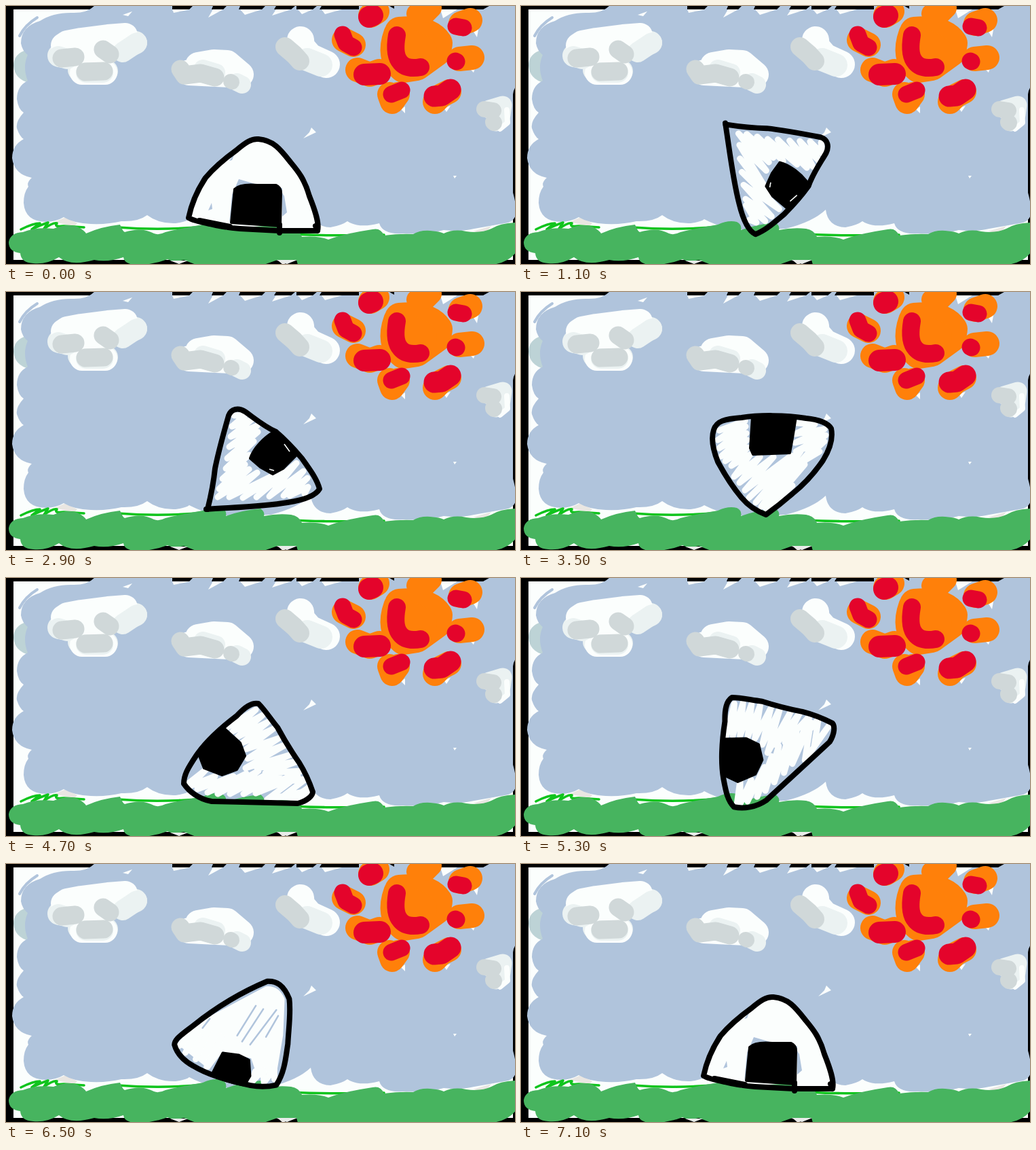
An HTML page that plays this animation: 750x380 px, repeating every 7130 ms.

```html
<!DOCTYPE html>
<html lang="en">
<head>
<meta charset="utf-8">
<title>Rolling rice ball</title>
<style>
  html, body { margin: 0; width: 750px; height: 380px; overflow: hidden; background: #000; }
  svg { display: block; }
  .brush path, .rim, .rice, .nori { stroke-linecap: round; stroke-linejoin: round; }
  .brush path { fill: none; }
  .white { stroke: #fbfefd; }
  .pale { stroke: #ebf2f2; }
  .gray { stroke: #d0d8d9; }
  .orange { stroke: #ff800a; }
  .red { stroke: #e4042b; }
  .grass { stroke: #10c41d; stroke-width: 3.6; }
  .rice { fill: none; stroke: #fbfefd; stroke-width: 9; }
  .rim { fill: none; stroke: #000; stroke-width: 8; }
  .nori { fill: #000; stroke: #000; stroke-width: 4; }
  .pose {
    visibility: hidden;
    animation: show 7130ms step-end calc((var(--k) - 1) * 600ms - 6630ms) infinite;
  }
  .rest { animation: rest 7130ms step-end -30ms infinite; }
  @keyframes show { 0% { visibility: visible; } 8.4151%, 100% { visibility: hidden; } }
  @keyframes rest { 0% { visibility: visible; } 7.4334%, 100% { visibility: hidden; } }
</style>
</head>
<body>
<svg width="750" height="380" viewBox="0 0 750 380">
  <defs>
    <g id="upright">
      <path fill="#fbfefd" d="M372 196C362 195 353 201 340 212C322 225 305 240 294 253C284 268 274 288 269 312L300 321L345 328L402 331L459 331C462 320 455 300 447 280C440 255 430 243 420 231C405 212 395 198 372 196Z"/>
      <path fill="#b0c4dc" d="M333 278L343 255L367 262L400 264L410 280L414 304L407 310V268H340L329 320ZM303 290L304 299L298 301ZM329 228L337 217L333 227Z"/>
      <path fill="#47b45f" d="M365 325L403 323V330Z"/>
      <path class="nori" d="M337 270Q345 262 370 264L398 264Q405 267 405 275L404 324L332 319Z"/>
      <path class="rim" d="M372 196C362 195 353 201 340 212C322 225 305 240 294 253C284 268 274 288 269 312C275 316 290 319 300 321C315 325 330 327 345 328L402 331L459 331C462 320 455 300 447 280C440 255 430 243 420 231C405 212 395 198 372 196ZM285 316L330 325M403 322V334M456 324L459 331"/>
    </g>

    <g id="right">
      <path class="rice" d="M288 247L325 232L289 257L332 236L296 270L322 260L301 284L337 260L305 292L348 253L312 300L362 236L318 310L380 225L330 284L400 216L352 252L418 210L375 235L422 215L398 243L421 226L402 251L418 250M318 310L350 288L332 318L358 296L348 321L366 303L358 323L380 309L372 322L387 320"/>
      <path class="nori" d="M376 248L392 249L403 254L410 268L405 292L396 298L384 297L362 286L364 265ZM370 290L402 306"/>
      <path class="rim" d="M350 331C335 322 320 312 310 304C298 292 292 282 291 270C284 260 277 253 278 243C280 236 290 234 305 230L355 215C375 207 395 200 420 196L428 195C432 202 432 215 430 225C425 245 420 262 412 280C408 295 402 312 393 325C380 330 365 331 350 332Z"/>
    </g>

    <g id="upperRight">
      <path class="rice" d="M336 182L353 181L333 198L362 188L331 213L370 197L329 228L371 206L326 245L365 220L324 260L358 240L319 275L352 254L314 290L358 261L312 302L370 266L329 302L390 272L349 303L408 266L369 302L428 252L388 301L438 264L409 300L444 274L418 300L445 287L440 297"/>
      <path class="nori" d="M393 207C405 215 420 228 428 240L408 260L393 268L375 258L360 245C365 230 380 215 393 207Z"/>
      <path fill="none" stroke="#fbfefd" stroke-width="1.6" d="M410 224L418 235M388 261L395 263"/>
      <path class="rim" d="M297 320C302 300 306 280 308 260C313 235 320 210 328 182C332 172 342 170 352 176C365 185 380 198 398 206C412 218 425 232 436 245C448 262 458 275 462 290C455 302 435 307 415 310C380 316 340 317 295 320"/>
    </g>

    <g id="flipped">
      <path class="rice" d="M292 204L330 190L290 218L331 198L292 230L332 208L295 242L333 218L301 249L334 229L310 256L338 239L314 272L352 243L322 281L372 243L330 292L398 241L336 303L406 238L346 310L412 235L354 316L425 235L361 319L418 254L362 320L400 285M407 193L433 195L404 209L447 202L404 222L449 211L405 235L447 220L415 250L440 235"/>
      <path class="nori" d="M341 184L405 184L400 215L396 237L342 239L338 230Z"/>
      <path class="rim" d="M361 328C345 322 335 315 325 303C310 285 298 265 290 250C282 230 280 215 284 203C288 190 300 187 325 185C350 181 390 181 420 186C440 188 452 193 457 201C460 215 455 232 445 248C430 270 415 285 400 297C385 310 372 320 361 328Z"/>
    </g>

    <g id="left">
      <path class="rice" d="M326 220L368 194L334 226L378 202L341 234L386 212L348 243L394 222L354 252L402 236L356 266L413 245L353 280L420 260L370 280L430 270L382 287L436 284L395 302L442 296L410 320L446 314L385 326L430 292L368 317L408 285L350 318L390 286L330 318L372 284L312 318L354 288L297 316L335 292L282 311L308 292L272 306L296 281L268 303"/>
      <path class="nori" d="M322 222L345 243L352 262L340 282L318 290L292 280L285 262C295 245 308 232 322 222Z"/>
      <path class="rim" d="M372 185C362 183 352 190 340 203C315 222 295 240 280 262C268 280 262 290 262 303C270 315 285 326 303 329C345 330 385 331 430 332C445 328 452 320 452 315C447 300 440 285 432 272C418 252 408 235 400 220C390 208 382 195 372 185Z"/>
    </g>

    <g id="lowerLeft">
      <path fill="#fbfefd" d="M258 222L297 202L410 194Q428 200 428 222L404 270L372 318L345 306L347 282L313 256L284 272Z"/>
      <path class="rice" d="M258 222L290 208M262 235L300 208M272 250L310 215M282 267L320 235M345 302L332 315L356 305L350 322L372 310L366 324"/>
      <path fill="none" stroke="#b0c4dc" stroke-width="2.5" stroke-linecap="round" d="M300 212L315 204M342 243L385 214M345 254L393 223M354 263L410 232M380 262L409 241"/>
      <path class="nori" d="M312 258L332 270L343 283L335 305L322 314C305 303 293 292 285 280Z"/>
      <path class="rim" d="M365 333C350 330 340 325 330 318C305 300 280 280 265 258C255 245 250 232 252 218C255 210 270 208 290 203C325 194 370 187 415 188C428 193 435 203 434 225C428 245 415 265 405 285C395 300 385 320 365 333Z"/>
    </g>
  </defs>

  <!-- paper and sky -->
  <path fill="#fbfefd" d="M11 5H747V374H11Z"/>
  <path fill="#bdd3d6" d="M32 64Q11 70 11 88Q13 108 34 113Z"/>
  <path fill="#e9e6e2" d="M72 318L88 311L105 320L100 325ZM688 332L715 324L706 335ZM395 370H432L408 381Z"/>
  <path fill="#b0c4dc" d="M130 0Q120 10 100 10Q70 9 50 22Q22 30 22 55Q24 66 32 72Q24 90 32 110Q16 118 16 137Q18 152 26 157Q14 170 16 180Q20 192 26 196Q9 205 9 224Q12 248 38 253Q30 260 33 266Q26 275 26 290Q28 318 60 318Q75 317 85 311Q100 320 125 321Q150 322 170 317Q195 318 208 308Q225 321 250 320Q265 318 270 314Q300 330 340 330L390 328Q430 318 449 300Q452 325 478 326Q495 323 503 317Q520 328 550 320Q555 337 585 335Q620 337 645 330Q670 333 690 328L735 320Q752 318 752 300Q750 285 747 275V130Q748 122 752 118V0Z"/>
  <path fill="none" stroke="#b0c4dc" stroke-width="4" stroke-linecap="round" d="M20 44Q28 28 46 17"/>
  <path fill="#fbfefd" d="M172 13L186 8L180 15ZM245 5H272L247 10ZM305 5H320L298 17ZM345 5H377L352 13ZM398 5H420L392 14ZM430 5H452L436 12ZM465 5H495L470 12ZM640 5H665L644 18ZM684 30L698 24L694 46ZM438 195L447 186L450 179L457 186ZM659 250H664L661 254ZM582 152L588 148V158ZM683 92L691 92L689 98ZM645 150L655 147L649 156Z"/>
  <path d="M245 0H275L270 5H245ZM305 0H325L320 5H303ZM345 0H382L377 5H343ZM398 0H426L420 5H395ZM428 0H458L452 5H428ZM465 0H520V5H462ZM565 0H572V4ZM640 0H712L703 5H640Z"/>

  <g class="brush">
    <!-- clouds -->
    <path class="pale" stroke-width="34" d="M78 73L95 75M172 62L191 54M108 94L148 96"/>
    <path class="white" stroke-width="36" d="M84 58L90 54L111 50L150 45L176 43M115 72L146 70M112 98L146 98"/>
    <path class="pale" stroke-width="30" d="M172 68L193 54M77 74L90 78M118 98L143 98"/>
    <path class="gray" stroke-width="27" d="M82 77L102 75M143 64L153 71M117 97L144 96"/>
    <path fill="#b0c4dc" d="M131 77L137 75L134 81Z"/>
    <path class="white" stroke-width="38" d="M283 87L306 83L326 84L346 101M270 98L330 101"/>
    <path class="pale" stroke-width="26" d="M340 112L348 116M290 92L310 98"/>
    <path class="gray" stroke-width="27" d="M257 93L263 102L287 99L308 105"/>
    <path class="gray" stroke-width="22" d="M331 111L333 112"/>
    <path class="white" stroke-width="40" d="M434 50L435 60L448 75L472 86"/>
    <path class="pale" stroke-width="34" d="M444 79L464 87"/>
    <path class="gray" stroke-width="28" d="M411 60L425 72L433 81"/>
    <path class="pale" stroke-width="27" d="M712 152L732 146L730 160L722 171"/>
    <path class="white" stroke-width="8" d="M738 153L739 172L728 181"/>
    <path class="gray" stroke-width="24" d="M705 152L718 154M718 171L719 172"/>

    <!-- sun -->
    <path class="orange" stroke-width="44" d="M578 42Q566 75 586 91L605 88L634 67L636 55Q622 34 580 38"/>
    <path class="orange" stroke-width="46" d="M590 55L612 66"/>
    <path class="orange" stroke-width="36" d="M537 14L547 8M498 50L512 57M518 94L536 101L550 96M565 130L569 141L577 130M632 141L641 132L653 126M668 78L687 76M670 26L684 21"/>
    <path class="orange" stroke-width="28" d="M620 11L628 3M604 11L615 8"/>
    <path fill="#b0c4dc" d="M603 46L608 45L607 49ZM611 55L615 57L612 59ZM598 10L604 13L599 15Z"/>
    <path class="red" stroke-width="26" d="M576 43Q571 72 581 83Q590 94 611 90"/>
    <path class="red" stroke-width="32" d="M535 16L540 14M528 101L551 100"/>
    <path class="red" stroke-width="25" d="M496 42L501 55L512 61M568 130L583 124M663 30L674 32M662 81L664 82"/>
    <path class="red" stroke-width="31" d="M631 133L642 132L655 123"/>

    <!-- grass -->
    <path class="grass" d="M22 329Q40 320 50 320L38 329Q52 322 62 319L56 328Q70 318 75 320Q70 326 85 324L115 326M165 326Q230 331 290 325M420 336Q470 339 557 337"/>
  </g>
  <path fill="#47b45f" d="M4 348Q6 334 25 333Q45 325 70 328Q90 320 105 325Q115 330 118 335Q140 325 168 322Q172 332 175 333Q200 325 218 335Q225 338 235 333Q260 327 290 322Q305 315 318 318Q326 322 324 330Q345 322 375 319Q382 324 380 330Q400 326 420 328Q432 330 436 340Q460 338 475 344Q500 335 540 329Q552 326 557 338Q580 335 600 336Q610 330 625 331Q640 332 645 335Q660 328 678 332Q700 335 715 328Q728 320 752 319V362Q740 379 715 381H430L428 374Q415 381 400 374L380 381H280L262 374L248 377L238 373Q215 382 190 381Q174 380 173 370Q150 378 130 374Q95 384 78 370Q60 381 40 379Q22 378 21 364Q4 362 4 348Z"/>
  <path fill="#e9ecea" d="M242 375H268L255 380ZM398 374H429L414 380Z"/>

  <!-- the roll, one turn -->
  <use class="pose rest" href="#upright"/>
  <use class="pose" style="--k:1" href="#right" transform="translate(0 3) rotate(45 362 258)"/>
  <use class="pose" style="--k:2" href="#upperRight" transform="translate(0 -23) rotate(85 366 261)"/>
  <use class="pose" style="--k:3" href="#right"/>
  <use class="pose" style="--k:4" href="#right" transform="translate(0 8) rotate(-28 362 258)"/>
  <use class="pose" style="--k:5" href="#upperRight"/>
  <use class="pose" style="--k:6" href="#flipped"/>
  <use class="pose" style="--k:7" href="#flipped" transform="translate(0 16) rotate(-25 368 238)"/>
  <use class="pose" style="--k:8" href="#left"/>
  <use class="pose" style="--k:9" href="#left" transform="translate(0 -24) rotate(-44 360 268)"/>
  <use class="pose" style="--k:10" href="#lowerLeft"/>
  <use class="pose" style="--k:11" href="#lowerLeft" transform="translate(0 6) rotate(-24 350 248)"/>
</svg>
</body>
</html>
```
